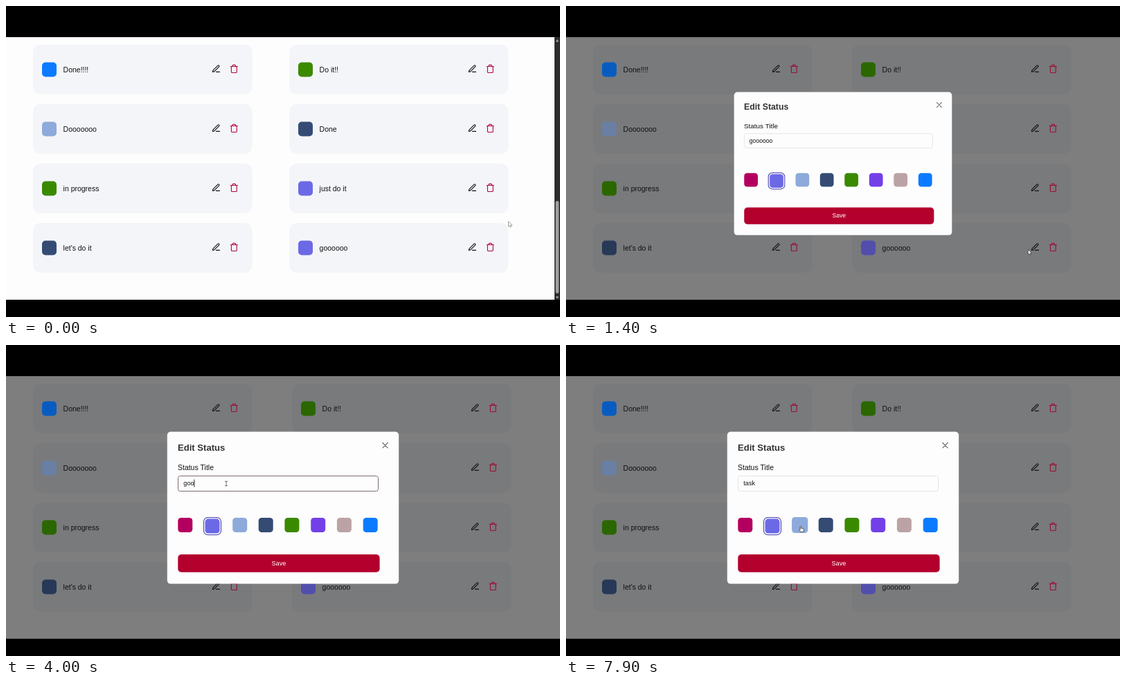
Write an HTML page with a canvas that moves like this. It is 800 px wide and 450 px high and loops after 8 s.

```html
<!DOCTYPE html>
<html lang="en">
<head>
<meta charset="utf-8">
<title>Edit status</title>
<style>
  html, body { margin: 0; width: 100%; height: 100%; overflow: hidden; background: #000; }
  canvas { display: block; width: 800px; height: 450px; }
</style>
</head>
<body>
<canvas id="stage" width="800" height="450"></canvas>
<script>
const ctx = document.getElementById('stage').getContext('2d');
const LOOP = 8000, OPEN = 1400, FOCUS = 2450, BLUR = 7450;
const FONT = '"Liberation Sans", Arial, sans-serif';
const C = {
  crimson: '#b3005e', violet: '#6c69e6', sky: '#8eaadb', navy: '#344c74',
  green: '#3a8a00', purple: '#7340e8', taupe: '#bba3a5', blue: '#0d7bff', red: '#b3002d'
};
const CARDS = [
  ['Done!!!!', C.blue], ['Do it!!', C.green],
  ['Dooooooo', C.sky], ['Done', C.navy],
  ['in progress', C.green], ['just do it', C.violet],
  ["let's do it", C.navy], ['goooooo', C.violet]
];
const SWATCHES = [
  [248.3, C.crimson], [287.5, C.violet], [327.2, C.sky], [364.7, C.navy],
  [402.4, C.green], [440.2, C.purple], [477.9, C.taupe], [515.7, C.blue]
];
const SELECTED = 1;

// Input contents by time
const EDITS = [[FOCUS, 'goooooo']];
for (let n = 6; n >= 0; n--) EDITS.push([3000 + (6 - n) * 300, 'goooooo'.slice(0, n)]);
[5500, 5800, 6050, 6450].forEach((at, i) => EDITS.push([at, 'task'.slice(0, i + 1)]));

// Pointer moves: start, end, destination
const HOME = [725.5, 312];
const MOVES = [[150, 1000, 667.3, 352.5], [1650, 2350, 318, 200.5], [6950, 7400, 338, 262]];

const PEN = new Path2D('M12 20h9M16.5 3.5a2.12 2.12 0 0 1 3 3L7 19l-4 1 1-4z');
const TRASH = new Path2D('M3 6h18M19 6v14a2 2 0 0 1-2 2H7a2 2 0 0 1-2-2V6M8 6V4a2 2 0 0 1 2-2h4a2 2 0 0 1 2 2v2');
const ARROW = new Path2D('M0 0V7.2L1.7 5.7 2.9 8.2 4 7.7 2.9 5.3H5.1Z');
const BEAM = new Path2D('M-1.6-3.2H1.6M-1.6 3.2H1.6M0-3.2V3.2');
const HAND = new Path2D('M0 .6Q.8-.5 1.5.6V3L4.6 3.7Q5.5 4 5.3 5L4.7 8.6H1.2L-1.4 5.5Q-1.3 4.3 0 5Z');

const clamp = u => Math.max(0, Math.min(1, u));
const smooth = u => u * u * (3 - 2 * u);

function rect(x, y, w, h, color) {
  ctx.fillStyle = color;
  ctx.fillRect(x, y, w, h);
}

function round(x, y, w, h, r, fill, stroke, lineWidth = 1) {
  ctx.beginPath();
  ctx.roundRect(x, y, w, h, r);
  if (fill) { ctx.fillStyle = fill; ctx.fill(); }
  if (stroke) { ctx.strokeStyle = stroke; ctx.lineWidth = lineWidth; ctx.stroke(); }
}

function text(str, x, y, size, color, weight = 'normal', align = 'left') {
  ctx.font = `${weight} ${size}px ${FONT}`;
  ctx.textAlign = align;
  ctx.fillStyle = color;
  ctx.fillText(str, x, y);
}

function path(shape, x, y, scale, stroke, lineWidth, fill) {
  ctx.save();
  ctx.translate(x, y);
  ctx.scale(scale, scale);
  ctx.lineCap = ctx.lineJoin = 'round';
  if (fill) { ctx.fillStyle = fill; ctx.fill(shape); }
  ctx.strokeStyle = stroke;
  ctx.lineWidth = lineWidth;
  ctx.stroke(shape);
  ctx.restore();
}

function pointerAt(t) {
  let [x, y] = HOME;
  for (const [start, end, toX, toY] of MOVES) {
    const u = smooth(clamp((t - start) / (end - start)));
    x += (toX - x) * u;
    y += (toY - y) * u;
  }
  return [x, y];
}

function drawPage(dimmed) {
  const shift = dimmed ? 4 : 0;
  const place = i => [i % 2 ? 409 + shift : 39, 56 + (i >> 1) * 86];

  rect(0, 45, 800, 380, '#fdfdfd');
  rect(0, 45, 792 + shift * 2, 1, '#f6e9ee');
  CARDS.forEach((_, i) => round(...place(i), 316.5, 71.8, 11, '#f4f5f9'));
  if (dimmed) rect(0, 45, 800, 380, 'rgba(0,0,0,.5)');

  CARDS.forEach(([label, color], i) => {
    const [x, y] = place(i);
    round(x + 13, y + 25.5, 21, 21, 5, color);
    if (dimmed) round(x + 13, y + 25.5, 21, 21, 5, 'rgba(0,0,0,.25)');
    text(label, x + 43.6, y + 39.5, 10.48, '#111');
    path(PEN, x + 257.7, y + 28.2, .56, '#111', 2);
    path(TRASH, x + 283.6, y + 28.2, .56, dimmed ? '#9c0b34' : '#b0053c', 2);
  });

  if (!dimmed) {
    rect(792, 45, 8, 380, '#2c2c2c');
    round(793.6, 282, 4.8, 134, 2.4, '#9f9f9f');
    for (const [y, dir] of [[50, -1], [422, 1]]) {
      ctx.beginPath();
      ctx.moveTo(793.7, y - dir * 1.7);
      ctx.lineTo(798.3, y - dir * 1.7);
      ctx.lineTo(796, y + dir * 1.7);
      ctx.fillStyle = '#9f9f9f';
      ctx.fill();
    }
  }
}

function drawInput(t) {
  const focused = t >= FOCUS && t < BLUR;
  const [since, value] = EDITS.filter(([at]) => at <= t).pop() || EDITS[0];
  round(248.5, 189.5, 289, 22, 3, '#fdfdfd', focused ? '#7c6c72' : '#e4e4e6');
  text(value || 'Enter status title', 256.3, 203.1, 9.17, value ? '#111' : '#c4c4c4');
  if (focused && (t - since) % 1000 < 500) {
    rect(256.2 + ctx.measureText(value).width * !!value, 194.5, .9, 11, '#111');
  }
}

function drawModal(t, hovered) {
  const scale = 1 - .06 * (1 - clamp((t - OPEN) / 200)) ** 3;
  ctx.save();
  ctx.translate(400, 109);
  ctx.scale(scale, scale);
  ctx.translate(-400, -109);

  round(232.8, 125.6, 334.4, 220, 5, '#fdfdfd');
  text('Edit Status', 248, 153.1, 13.1, '#333', 'bold');
  path(new Path2D('M-3.7-3.7 3.7 3.7M3.7-3.7-3.7 3.7'), 547.6, 145.2, 1, '#666', 1.1);
  text('Status Title', 248, 181.3, 10.48, '#111');
  drawInput(t);

  SWATCHES.forEach(([x, color], i) => {
    const y = i === SELECTED ? 251.6 : 250;
    const grow = i === hovered ? 1.1 : 0;
    round(x - grow, y - grow, 21 + grow * 2, 21 + grow * 2, 4.5, color);
    if (i === SELECTED) round(x - 2, y - 2, 25, 25, 6, null, '#5c59b8', 1.3);
  });

  round(248.3, 303, 291.3, 25.7, 5, C.red);
  text('Save', 393.9, 318.9, 9.17, '#fff', 'normal', 'center');
  ctx.restore();
}

function drawPointer(x, y, kind) {
  if (kind === 'beam') path(BEAM, x, y, 1, '#555', .8);
  else if (kind === 'hand') path(HAND, x, y, 1, '#333', .8, '#fff');
  else path(ARROW, x, y, 1, kind === 'dark' ? '#444' : '#8a8a8a', .8, '#fff');
}

function frame(now) {
  const t = now % LOOP;
  const open = t >= OPEN;
  const [x, y] = pointerAt(t);
  const hovered = open && y > 250 && y < 271
    ? SWATCHES.findIndex(([left]) => x > left && x < left + 21) : -1;
  const overInput = open && x > 248 && x < 538 && y > 189 && y < 212;

  rect(0, 0, 800, 450, '#000');
  drawPage(open);
  if (open) drawModal(t, hovered);
  drawPointer(x, y, overInput ? 'beam' : hovered >= 0 ? 'hand' : open ? 'dark' : 'light');
  requestAnimationFrame(() => frame(performance.now()));
}

frame(performance.now());
</script>
</body>
</html>
```
